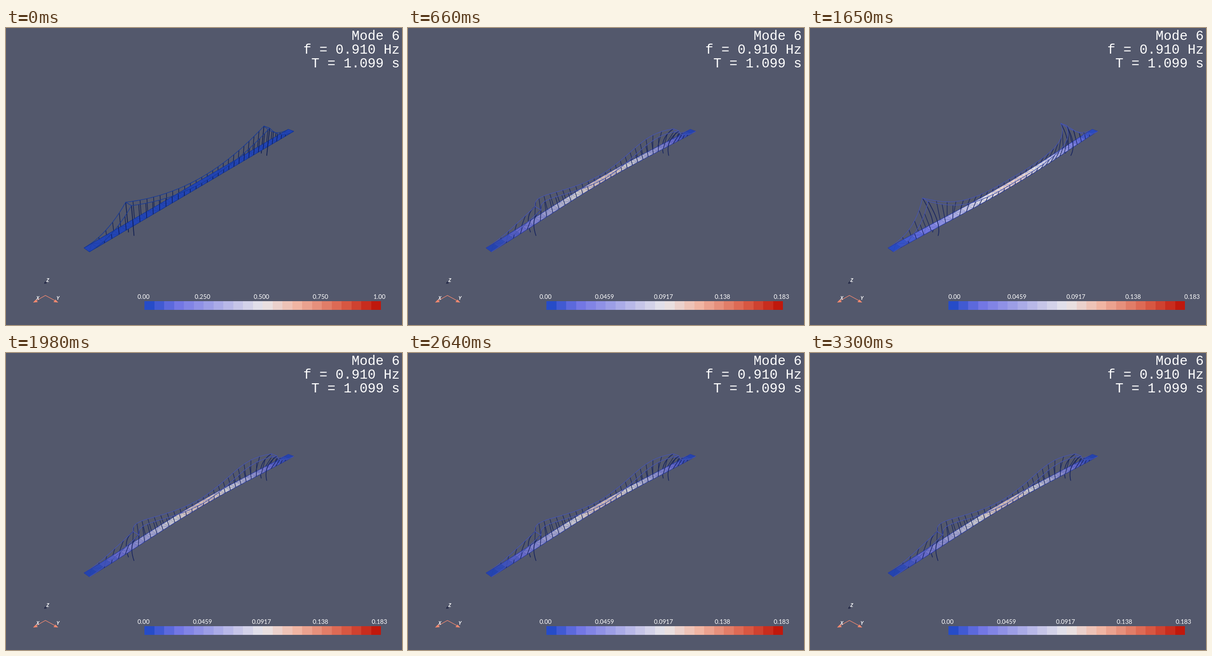
An HTML page with a canvas that plays this animation: 864 px wide and 648 px high, repeating every 3630 ms.

```html
<!DOCTYPE html>
<html lang="en">
<head>
<meta charset="utf-8">
<title>Bridge mode shape</title>
<style>
  html, body { margin: 0; width: 100%; height: 100%; overflow: hidden; background: #53586c; }
  canvas { display: block; width: 864px; height: 648px; }
</style>
</head>
<body>
<canvas id="stage" width="864" height="648"></canvas>
<script>
const ctx = document.getElementById('stage').getContext('2d');
const STEP = 330, STEPS = 11;
const PANELS = 36, SIDE = 6;
const TOWERS = [SIDE, PANELS - SIDE];

// Colour ramp: position and colour
const RAMP = [
  [0, [38, 76, 200]], [.12, [112, 116, 228]], [.5, [232, 230, 234]],
  [.65, [240, 182, 164]], [.85, [218, 96, 74]], [1, [192, 24, 12]]
];
const REST = { amp: 0, max: 1, light: .9, align: 'center', labelX: 300,
  line: '#15358f', cable: '#173a98', hanger: '#0d1c52' };
const SWAY = { amp: 1, max: .18345, light: .97, align: 'left', labelX: 302,
  line: '#2a3c9c', cable: '#4654b0', hanger: '#17245f' };
const BACK = { ...SWAY, amp: -1, light: .87, align: 'center', labelX: 300 };

function ramp(v, light = 1) {
  const i = Math.max(1, RAMP.findIndex(([at]) => at >= v));
  const [p, a] = RAMP[i - 1], [q, b] = RAMP[i];
  const k = (v - p) / (q - p);
  return `rgb(${a.map((c, n) => Math.round((c + (b[n] - c) * k) * light))})`;
}

// Perspective projection: panel along the deck, w across, z up (tower top = 1)
function project(panel, w, z) {
  const u = panel / PANELS;
  const d = 1 + .36 * u - .0097 * w - .032 * z;
  return [(170 + 667.76 * u + 10.2 * w - 12.8 * z) / d,
          (480 - 179.44 * u + 3.76 * w - 59.3 * z) / d];
}

// Sideways mode shapes, in deck widths
const deckShift = n => .7 * Math.sin(Math.PI * n / PANELS) ** 1.5;
const fromTower = n => Math.min(n - SIDE, PANELS - SIDE - n);
function cableShift(n) {
  const k = fromTower(n);
  if (k < 0) return -1.3 * (1 + k / SIDE) ** 3;
  return .5 - Math.exp(-k / 3) * (1.8 - .95 * k);
}
function cableHeight(n) {
  const k = fromTower(n);
  if (k < 0) return (1 + k / SIDE) ** 2.1;
  return .13 + .87 * ((n - PANELS / 2) / 12) ** 2;
}
function towerShift(z) {
  return deckShift(SIDE) * (z + .5) * (1 - z) * 2 - 1.3 * (z + .5) * z / 1.5;
}

function path(points, color, width = 1) {
  ctx.beginPath();
  points.forEach(p => ctx.lineTo(p[0], p[1]));
  ctx.strokeStyle = color;
  ctx.lineWidth = width;
  ctx.stroke();
}
function fill(points, color) {
  ctx.beginPath();
  points.forEach(p => ctx.lineTo(p[0], p[1]));
  ctx.closePath();
  ctx.fillStyle = color;
  ctx.fill();
}
function text(str, x, y, font, align = 'left') {
  ctx.font = font;
  ctx.textAlign = align;
  ctx.fillStyle = '#fff';
  ctx.fillText(str, x, y);
}
const range = (a, b, step) =>
  Array.from({ length: Math.round((b - a) / step) + 1 }, (_, i) => a + i * step);

function drawBridge({ amp, line, cable, hanger, light }) {
  const deck = (n, w) => project(n, w + amp * deckShift(n), 0);
  const rope = (n, w) => project(n, w + amp * cableShift(n), cableHeight(n));
  const leg = (n, w, z) => project(n, w + amp * towerShift(z), z);
  const along = range(0, PANELS, .5);

  const side = w => {
    for (let n = 1; n < PANELS; n++)
      if (!TOWERS.includes(n)) path([rope(n, w), deck(n, w)], hanger, 1.3);
    for (const n of TOWERS)
      path(range(-.5, 1, .125).map(z => leg(n, w, z)), hanger, 1.6);
    path(along.map(n => rope(n, w)), cable, 1.3);
  };

  side(0);
  for (let n = 0; n < PANELS; n++) {
    const quad = [deck(n, 0), deck(n + 1, 0), deck(n + 1, 1), deck(n, 1)];
    const v = Math.abs(amp) * deckShift(n + .5) * .8;
    const color = ramp(v, light);
    fill(quad, color);
    path([quad[1], quad[2]], color);
    ctx.globalAlpha = .35;
    path([quad[0], quad[3]], line);
    path(n % 2 ? [quad[0], quad[2]] : [quad[3], quad[1]], line);
    ctx.globalAlpha = 1;
  }
  for (const w of [0, 1]) path(along.map(n => deck(n, w)), line, 1.2);
  for (const n of [0, PANELS]) path([deck(n, 0), deck(n, 1)], line);
  side(1);
  for (const n of TOWERS) path([leg(n, 0, 1), leg(n, 1, 1)], cable, 1.5);
}

function drawBar({ max, align, labelX }) {
  const x = 302, width = 516, bands = 24;
  const edge = i => Math.round(x + width * i / bands);
  for (let i = 0; i < bands; i++) {
    ctx.fillStyle = ramp(i / (bands - 1));
    ctx.fillRect(edge(i), 596, edge(i + 1) - edge(i), 19);
  }
  for (let i = 0; i <= 4; i++)
    text((max * i / 4).toPrecision(3), labelX + 128.7 * i, 591,
      '13.2px Lato, "Liberation Sans", sans-serif', align);
}

function drawAxes() {
  const coral = '#f58a70', ink = '#14193a';
  const font = 'italic bold 10px "Liberation Sans", sans-serif';
  path([[62, 597], [86, 583.5], [111, 597]], coral, 1.3);
  fill([[59, 599], [65, 592.5], [69.5, 598]], coral);
  fill([[114, 599], [108, 592.5], [103.5, 598]], coral);
  path([[84, 558], [85.5, 554]], ink, 1.5);
  path([[87, 558], [88, 552]], ink, 1.5);
  text('X', 66, 593, font);
  text('Y', 110, 593, font);
  text('Z', 88, 554, font);
}

function draw(pose) {
  ctx.fillStyle = '#53586c';
  ctx.fillRect(0, 0, 864, 648);
  ctx.lineJoin = 'round';
  drawBridge(pose);
  drawBar(pose);
  drawAxes();
  ['Mode 6', 'f = 0.910 Hz', 'T = 1.099 s'].forEach((str, i) =>
    text(str, 859, 25.5 + 30.2 * i, '29.2px "Liberation Mono", monospace', 'right'));
}

const start = performance.now();
let shown;
function tick(now) {
  const step = Math.floor(Math.max(0, now - start) / STEP) % STEPS;
  const pose = step === 0 ? REST : step % 2 ? SWAY : BACK;
  if (pose !== shown) draw(shown = pose);
  requestAnimationFrame(tick);
}
tick(start);
</script>
</body>
</html>
```
